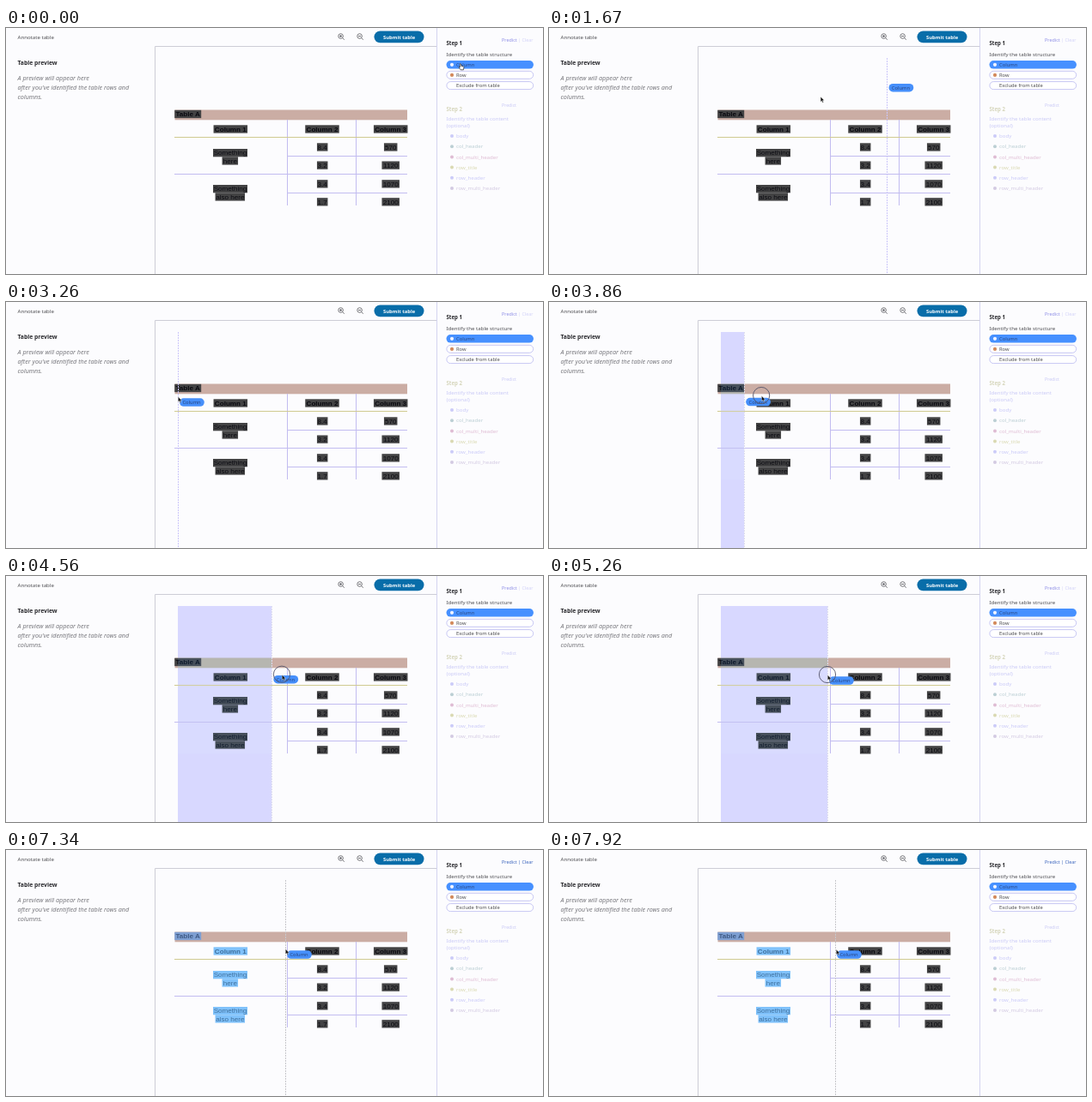
Write an HTML page that moves like this. It is 625 px wide and 287 px high and loops after 8 s.

```html
<!DOCTYPE html>
<html lang="en">
<head>
<meta charset="utf-8">
<title>Annotate table</title>
<style>
html, body { margin: 0; width: 100%; height: 100%; overflow: hidden; background: #fcfcfe; }
svg { display: block; width: 625px; height: 287px; }
text { font: 6.1px "Noto Sans", "Open Sans", sans-serif; fill: #4c4c50; }
.bold { font-weight: 600; fill: #29292d; }
.hint { font-size: 7.18px; font-style: italic; fill: #77777c; }
.small { font-size: 5.8px; }
.link { font-size: 5.4px; fill: #8f8fe6; }
.link .clear { fill: #d2d2f8; }
.done .link, .done .link .clear { fill: #3a64bd; }
.faded { fill: #c9c9f6; }
.cell rect { fill: #434344; }
.cell text { font: 8.1px "Liberation Sans", Arial, sans-serif; fill: #0a0a10; text-anchor: middle; }
.cell.head text { font-weight: 700; }
.done .first rect { fill: #80c2fb; }
.done .first text { fill: #3d6f9c; }
.done .title rect { fill: #7e9fd2; }
.done .title text { fill: #3f5a85; }
.rules path { fill: none; stroke: #c2bcf0; }
.tint { mix-blend-mode: screen; }
</style>
</head>
<body>
<svg id="stage" viewBox="0 0 625 287">
  <defs>
    <clipPath id="canvas"><rect x="174" y="22" width="327" height="265"/></clipPath>
  </defs>

  <path d="M173.5 287V21.5H501" fill="none" stroke="#cdcdd6"/>
  <path d="M501.5 0V287" stroke="#d3d3f0"/>

  <text x="13.5" y="12.7">Annotate table</text>
  <g fill="none" stroke="#55555a" stroke-width=".8">
    <g id="zoom"><circle cx="389.6" cy="9.5" r="2.8"/><path d="M391.6 11.5l2.2 2.2M388.1 9.5h3"/></g>
    <use href="#zoom" x="22"/>
    <path d="M389.6 8v3"/>
  </g>
  <rect x="428.5" y="3.5" width="58" height="13.7" rx="6.85" fill="#086da9"/>
  <text x="457.6" y="12.6" text-anchor="middle" style="font-size:5.8px;fill:#fff;font-weight:600">Submit table</text>

  <text class="bold" x="13.5" y="43.2" style="font-size:6.75px">Table preview</text>
  <text class="hint" x="13.5" y="60.6">A preview will appear here</text>
  <text class="hint" x="13.5" y="71.8">after you've identified the table rows and</text>
  <text class="hint" x="13.5" y="83">columns.</text>

  <text class="bold" x="512.5" y="20.2">Step 1</text>
  <text class="link" x="577" y="16">Predict <tspan class="clear">| Clear</tspan></text>
  <text x="512.5" y="32.6">Identify the table structure</text>
  <rect x="512.5" y="38" width="101.5" height="9.6" rx="4.8" fill="#4690ff"/>
  <g fill="#fff" stroke="#b9b9f0" stroke-width=".8">
    <rect x="512.9" y="50.3" width="100.8" height="9" rx="4.5"/>
    <rect x="512.9" y="62.6" width="100.8" height="9" rx="4.5"/>
  </g>
  <circle cx="519" cy="42.8" r="2.1" fill="#f2f4ff"/>
  <circle cx="519" cy="54.9" r="2.1" fill="#d38a5c"/>
  <text class="small" x="524" y="44.9" style="fill:#294781">Column</text>
  <text class="small" x="524" y="57">Row</text>
  <text class="small" x="524" y="69.2">Exclude from table</text>

  <text class="bold" x="512.5" y="96.6" style="fill:#d6d6bc">Step 2</text>
  <text class="faded" x="577" y="92" style="font-size:5.2px">Predict</text>
  <text class="faded" x="512.5" y="108.3">Identify the table content</text>
  <text class="faded" x="512.5" y="115.5">(optional)</text>
  <g id="labels"></g>

  <rect x="196.5" y="95.5" width="270.5" height="11.8" fill="#cbada4"/>
  <g class="column">
    <rect x="200" y="35" height="252" fill="#d8d8ff"/>
    <rect x="200" y="95.5" height="11.8" fill="#b4b0a5"/>
  </g>
  <g class="rules">
    <path d="M196 170.5H467M327 149.5H467M327 192.5H467M327.5 107V207M407.5 107V207"/>
    <path d="M196 127.5H467" style="stroke:#d0ca90"/>
  </g>
  <g id="cells"></g>
  <g class="column tint"><rect x="200" y="95.5" height="112" fill="#06121f"/></g>

  <g clip-path="url(#canvas)">
    <path id="guide" d="M.5 35V287" stroke-dasharray="2 1"/>
    <g id="tag">
      <rect x="2" y="2.3" width="28.8" height="9.5" rx="4.75" fill="#468ffa"/>
      <text class="small" x="5.4" y="9.1" style="fill:#294781">Column</text>
    </g>
  </g>
  <g id="pointer">
    <circle id="press" r="9.6" fill="none" stroke="#55556a" stroke-width=".9"/>
    <path id="arrow" d="M.3 .6V6.6L1.7 5.4 2.7 7.6 3.7 7.1 2.7 5H4.6Z" fill="#111" stroke="#fff" stroke-width=".4"/>
    <path id="hand" d="M-1 0Q0-1 .6 .2L1 2.4Q3.5 2 4 3.8L3.4 6.8H.2L-2 4Q-1.8 3-.5 3.7Z" fill="#fff" stroke="#222" stroke-width=".7"/>
  </g>
</svg>
<script>
const LOOP = 8000, LAG = 150, PRESS = 3420, RELEASE = 6800, COMMIT = 7020;
const $ = id => document.getElementById(id);
const columnRects = document.querySelectorAll('.column rect');

// Pointer path: time, x, y
const path = [
  [0, 529, 42], [1150, 529, 42], [1400, 460, 50], [1520, 394, 62.5],
  [1670, 316, 79.5], [1950, 262, 96], [2410, 220, 107.5], [2560, 211, 109.5],
  [3050, 200, 110], [3480, 200, 110], [3710, 227, 109.5], [3860, 247, 109],
  [4200, 293, 112], [4600, 324, 115], [6600, 324, 115], [6760, 325, 115],
  [7560, 325, 115], [7770, 333, 115], [7920, 334, 115.5], [LOOP, 334, 115.5]
];

function position(t) {
  if (t <= 0) return path[0].slice(1);
  const i = path.findIndex(p => p[0] >= t);
  const [t0, x0, y0] = path[i - 1], [t1, x1, y1] = path[i];
  const k = (t - t0) / (t1 - t0);
  return [x0 + (x1 - x0) * k, y0 + (y1 - y0) * k];
}

const cell = (text, x, y, width, kind = '') =>
  `<g class="cell ${kind}"><rect x="${x - width / 2}" y="${y}" width="${width}" height="9.3"/>` +
  `<text x="${x}" y="${y + 7.4}">${text}</text></g>`;

const rowTops = [134.3, 155.5, 177.2, 198.2];
$('cells').innerHTML = [
  cell('Table A', 211.7, 95.8, 31, 'head first title'),
  ...[261.3, 368, 447.7].map((x, i) =>
    cell('Column ' + (i + 1), x, 113.3, 39.5, i ? 'head' : 'head first')),
  cell('Something', 261, 141, 40, 'first'),
  cell('here', 260.8, 150.3, 18.5, 'first'),
  cell('Something', 261, 183, 40, 'first'),
  cell('also here', 260.8, 192.3, 34.5, 'first'),
  ...['8.4', '3.2', '3.4', '1.7'].map((s, i) => cell(s, 368.2, rowTops[i], 12.5)),
  ...['570', '1120', '1070', '2100'].map((s, i) => cell(s, 447.7, rowTops[i], i ? 20.5 : 15.5))
].join('');

$('labels').innerHTML = [
  ['body', '#cbcbf8'], ['col_header', '#bccfd4'], ['col_multi_header', '#dfbcd4'],
  ['row_title', '#dad9b2'], ['row_header', '#cbcbf8'], ['row_multi_header', '#d3cae2']
].map(([name, color], i) => {
  const y = 126 + i * 12.2;
  return `<circle cx="519" cy="${y}" r="2" fill="${color}"/>` +
    `<text x="524" y="${y + 2.1}" style="fill:${color}">${name}</text>`;
}).join('');

const show = (el, visible) => el.setAttribute('visibility', visible ? 'visible' : 'hidden');
const move = (el, x, y) => el.setAttribute('transform', `translate(${x.toFixed(2)} ${y.toFixed(2)})`);

function draw(t) {
  const [x, y] = position(t), [lagX, lagY] = position(t - LAG);
  const selecting = t >= PRESS && t < COMMIT, done = t >= COMMIT;

  move($('pointer'), x, y);
  show($('hand'), x > 513);
  show($('arrow'), x <= 513);
  show($('press'), t >= PRESS && t < RELEASE);

  move($('tag'), lagX, lagY);
  move($('guide'), Math.round(lagX), 0);
  $('guide').setAttribute('stroke', done ? '#c8c8cc' : selecting ? '#dedeee' : '#cbc6fa');

  columnRects.forEach(r => r.setAttribute('width', selecting ? Math.max(0, Math.round(lagX) - 200) : 0));
  $('stage').classList.toggle('done', done);
}

const start = performance.now();
function tick() {
  draw((performance.now() - start) % LOOP);
  requestAnimationFrame(tick);
}
tick();
</script>
</body>
</html>
```
